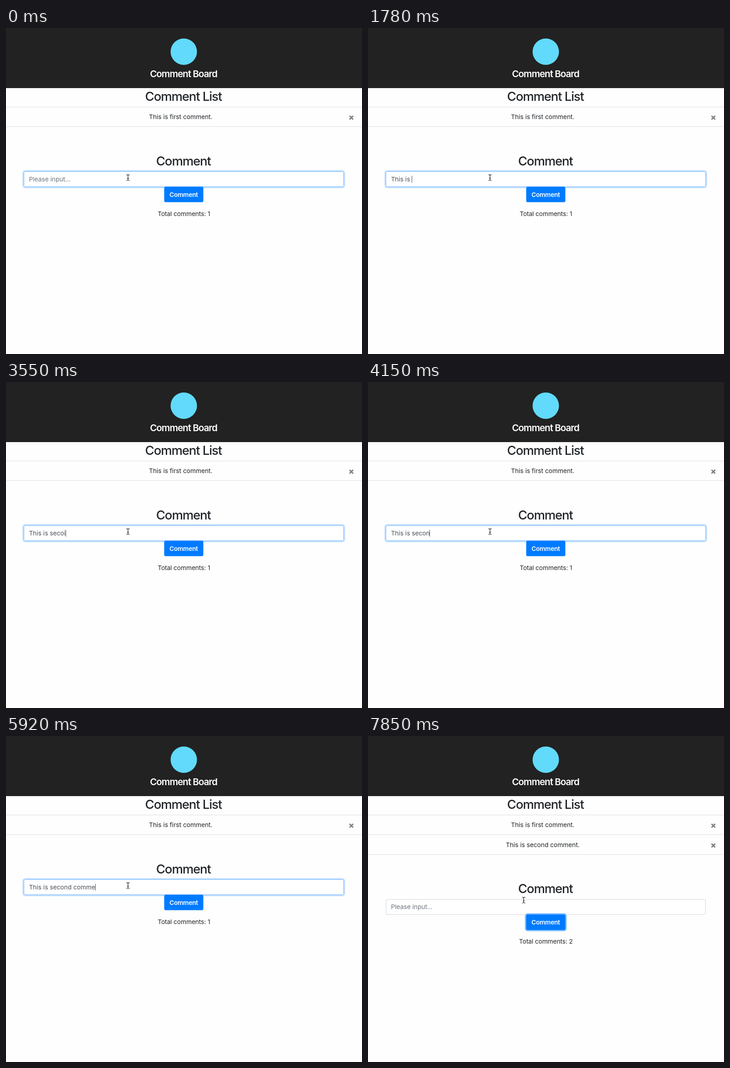
An HTML page for the animation above (8 s loop, 782 by 716 pixels).

```html
<!DOCTYPE html>
<html lang="en">
<head>
<meta charset="utf-8">
<title>Comment Board</title>
<style>
  html, body { margin: 0; width: 100%; height: 100%; overflow: hidden; background: #fefefe; }
  svg { display: block; width: 782px; height: 716px; }
  text {
    font: 400 13.75px Inter, "Open Sans", sans-serif;
    font-optical-sizing: none;
    letter-spacing: -.02px;
    white-space: pre;
    fill: #212529;
  }
  .mid { text-anchor: middle; }
  .title { font-size: 20.6px; font-weight: 600; letter-spacing: -1px; fill: #fff; }
  .head { font-size: 27.5px; font-weight: 500; letter-spacing: -1.1px; }
  .btn { font-weight: 600; letter-spacing: -.3px; fill: #fff; }
  .total { letter-spacing: -.1px; }
  .rule { stroke: #dfdfdf; }
  .close { stroke: #808080; stroke-width: 3; }
</style>
</head>
<body>
<svg viewBox="0 0 782 716">
  <defs>
    <path id="cross" class="close" d="M754.6 193 l8 8 m0 -8 l-8 8"/>
    <path id="beam" d="M-3.5 -6.5 Q-.3 -6.5 0 -4.5 Q.3 -6.5 3.5 -6.5 M0 -4.5 V4.5
      M-3.5 6.5 Q-.3 6.5 0 4.5 Q.3 6.5 3.5 6.5 M-2 1.5 H2" fill="none"/>
  </defs>
  <rect width="782" height="716" fill="#fefefe"/>
  <rect width="782" height="132" fill="#222"/>
  <circle cx="390.5" cy="52" r="29" fill="#61dafb"/>
  <text class="mid title" x="390" y="108.3">Comment Board</text>

  <text class="mid head" x="389.8" y="159.8">Comment List</text>
  <path class="rule" d="M0 173.5 H782 M0 216.5 H782"/>
  <text class="mid" x="383.8" y="200.4">This is first comment.</text>
  <use href="#cross"/>
  <g id="second">
    <path class="rule" d="M0 260.5 H782"/>
    <text class="mid" x="383.8" y="244">This is second comment.</text>
    <use href="#cross" y="43.5"/>
  </g>

  <g id="form">
    <text class="mid head" x="389.8" y="301.6">Comment</text>
    <rect id="inputRing" x="37.6" y="313.6" width="705.8" height="36.8" rx="5"
      fill="none" stroke="#007bff" stroke-opacity=".25" stroke-width="2.8"/>
    <rect id="input" x="39.5" y="315.5" width="702" height="33" rx="3.2" fill="#fff"/>
    <text id="value" x="50.5" y="336.9"></text>
    <rect id="caret" y="324.5" width="1" height="15" fill="#495057"/>
    <rect id="btnRing" x="344.7" y="345.7" width="91.6" height="39.6" rx="6" fill="#80bdff"/>
    <rect x="347.5" y="348.5" width="86" height="34" rx="3.6" fill="#007bff"/>
    <text class="mid btn" x="390.4" y="370.9">Comment</text>
    <text id="total" class="mid total" x="390.8" y="412.6"></text>
  </g>

  <g id="cursor">
    <use href="#beam" stroke="#fff" stroke-width="2.6" stroke-opacity=".8"/>
    <use href="#beam" stroke="#111" stroke-width="1.1"/>
  </g>
</svg>
<script>
const LOOP = 8000, STEPS = 54;
const MESSAGE = "This is second comment.";
// Step at which each character of the message lands.
const KEYS = [2, 4, 5, 7, 8, 10, 11, 12, 14, 16, 19, 21, 27, 30, 33, 34, 36, 37, 39, 40, 42, 43, 44];
const TYPO = { from: 23, to: 25, text: "i" };
const BLINK = 4, MOVE = 48, SUBMIT = 52;
const PATH = [[268, 328], [296, 340], [336, 358], [356, 366], [354, 365], [342, 360]];

const el = id => document.getElementById(id);
const set = (id, attrs) => {
  for (const name in attrs) el(id).setAttribute(name, attrs[name]);
};
const show = (id, on) => set(id, { visibility: on ? "visible" : "hidden" });

function typedAt(step) {
  const count = KEYS.filter(key => key <= step).length;
  const typo = step >= TYPO.from && step < TYPO.to;
  const last = Math.max(count ? KEYS[count - 1] : -BLINK,
    ...[TYPO.from, TYPO.to].filter(key => key <= step));
  return {
    text: MESSAGE.slice(0, count) + (typo ? TYPO.text : ""),
    caret: step - last < BLINK
  };
}

function render(step) {
  const sent = step >= SUBMIT;
  const typed = sent ? { text: "", caret: false } : typedAt(step);
  const value = el("value");

  value.textContent = typed.text || "Please input...";
  value.style.fill = typed.text ? "#495057" : "#6c757d";
  show("caret", typed.caret);
  if (typed.caret) set("caret", { x: Math.round(50.3 + value.getComputedTextLength()) });

  show("second", sent);
  show("inputRing", !sent);
  show("btnRing", sent);
  set("input", { stroke: sent ? "#ced4da" : "#80bdff" });
  set("form", { transform: `translate(0 ${sent ? 43.5 : 0})` });
  el("total").textContent = `Total comments: ${sent ? 2 : 1}`;

  const [x, y] = PATH[Math.max(0, Math.min(step - MOVE, PATH.length - 1))];
  set("cursor", { transform: `translate(${x} ${y + .5})` });
}

const start = performance.now();
function tick() {
  const time = (performance.now() - start) % LOOP;
  render(Math.min(STEPS - 1, Math.floor((time + 15) * STEPS / LOOP)));
  requestAnimationFrame(tick);
}
tick();
</script>
</body>
</html>
```
